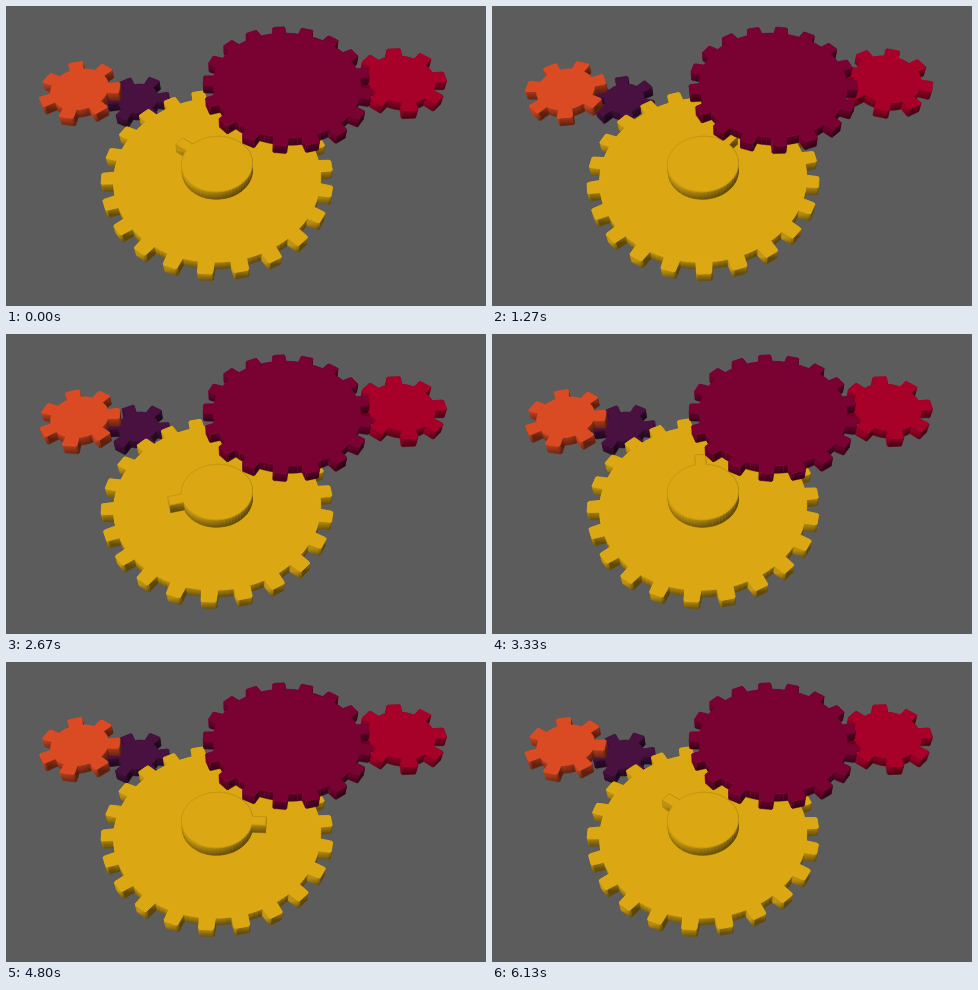
An HTML page with a canvas that plays this animation: 480x300 px, repeating every 6.19 s.

```html
<!DOCTYPE html>
<html lang="en">
<head>
<meta charset="utf-8">
<title>Gear train</title>
<style>
html, body { margin: 0; width: 100%; height: 100%; overflow: hidden; background: #5c5c5c; }
canvas { display: block; width: 480px; height: 300px; }
</style>
</head>
<body>
<canvas id="stage" width="480" height="300"></canvas>
<script>
const ctx = document.getElementById('stage').getContext('2d');
const LOOP = 6190, STEP = 1000 / 15, STEPS = 93;
const TAU = Math.PI * 2, DEG = Math.PI / 180;
const FOCAL = 672, SIN = 0.775, COS = 0.632;

// World: x right, y towards the viewer, z up. Scale is 1 at the stage centre.
function project([x, y], z) {
  const s = FOCAL / (FOCAL - y * COS - z * SIN);
  return [240 + x * s, 150 + (y * SIN - z * COS) * s];
}

function path(points) {
  ctx.beginPath();
  points.forEach(p => ctx.lineTo(p[0], p[1]));
  ctx.closePath();
}

const tint = (rgb, k) => `rgb(${rgb.map(c => Math.min(255, Math.round(c * k)))})`;

function drawPrism(outline, top, bottom, color, edge) {
  const walls = outline.map((a, i) => {
    const b = outline[(i + 1) % outline.length];
    const dx = b[0] - a[0], dy = b[1] - a[1];
    return { a, b, depth: a[1] + b[1], nx: dy / (Math.hypot(dx, dy) || 1) };
  }).sort((p, q) => p.depth - q.depth);
  for (const { a, b, nx } of walls) {
    const upper = project(a, top), lower = project(a, bottom);
    const fill = ctx.createLinearGradient(0, upper[1], 0, lower[1]);
    const k = 0.78 - 0.14 * nx;
    fill.addColorStop(0, tint(color, k));
    fill.addColorStop(1, tint(color, k * 0.62));
    path([upper, project(b, top), project(b, bottom), lower]);
    ctx.fillStyle = ctx.strokeStyle = fill;
    ctx.lineWidth = 0.5;
    ctx.fill();
    ctx.stroke();
  }
  path(outline.map(p => project(p, top)));
  ctx.fillStyle = tint(color, 1);
  ctx.strokeStyle = tint(color, edge);
  ctx.lineWidth = 0.8;
  ctx.fill();
  ctx.stroke();
}

const polar = (g, r, a) => [g.x + r * Math.cos(a), g.y + r * Math.sin(a)];

function drawGear(g, turn) {
  const pitch = TAU / g.teeth, root = g.r - g.depth, outline = [];
  for (let i = 0; i < g.teeth; i++) {
    const a = g.phase * DEG + (i + turn) * pitch;
    const add = (r, f) => outline.push(polar(g, r, a + f * pitch));
    add(root, -0.25);
    add(g.r - 1.2, -0.21);
    add(g.r, -0.175);
    add(g.r, 0.175);
    add(g.r - 1.2, 0.21);
    add(root, 0.25);
    add(root, 0.42);
    add(root, 0.58);
  }
  drawPrism(outline, g.z, g.z - 12, g.color, 1.04);
}

function drawKnob(g, angle) {
  const r = 34.3, tip = 47.5, half = 5.2;
  const start = Math.asin(half / r), end = Math.asin(half / tip);
  const outline = [polar(g, tip, angle - end), polar(g, tip, angle + end)];
  for (let i = 0; i <= 60; i++)
    outline.push(polar(g, r, angle + start + (TAU - 2 * start) * i / 60));
  drawPrism(outline, 14, 2, g.color, 0.9);
}

const purple  = { x: -116, y: -80.5, z: 0, r: 33, depth: 12, teeth: 6, phase: -2.5, color: [72, 17, 64] };
const orange  = { x: -181, y: -94.5, z: 0, r: 43.5, depth: 12.5, teeth: 7, phase: -105, color: [218, 75, 36] };
const yellow  = { x: -28, y: 20.3, z: 0, r: 113, depth: 12, teeth: 22, phase: 94, color: [219, 168, 20] };
const magenta = { x: 43.9, y: -91, z: 14, r: 89.6, depth: 11, teeth: 17, phase: -94, color: [121, 2, 51] };
const red     = { x: 167.3, y: -96, z: 14, r: 47.5, depth: 12, teeth: 8, phase: -93, color: [167, 1, 42] };

const ease = t => t * t * (3 - 2 * t);

// Degrees of the yellow wheel: forward past one turn, then back to exactly one turn.
const PEAK = 510, TURNBACK = 70;
function turnAt(n) {
  return n < TURNBACK
    ? PEAK * ease(n / TURNBACK)
    : PEAK + (360 - PEAK) * ease((n - TURNBACK) / (STEPS - TURNBACK));
}

// The knob's single tooth moves the magenta wheel by one tooth per revolution.
function pushed(deg) {
  const t = Math.min(1, Math.max(0, (deg % 360 - 76) / 40));
  return Math.floor(deg / 360) + t;
}

function draw(now) {
  const n = Math.floor((now % LOOP + 5) / STEP) % STEPS;
  const deg = turnAt(n), teeth = deg / 360 * yellow.teeth, push = pushed(deg);
  ctx.fillStyle = '#5c5c5c';
  ctx.fillRect(0, 0, 480, 300);
  drawGear(purple, -teeth);
  drawGear(orange, teeth);
  drawGear(yellow, teeth);
  drawKnob(yellow, (216 + deg) * DEG);
  drawGear(red, push);
  drawGear(magenta, -push);
}

let began;
function tick(now) {
  began ??= now;
  draw(now - began);
  requestAnimationFrame(tick);
}
draw(0);
requestAnimationFrame(tick);
</script>
</body>
</html>
```
